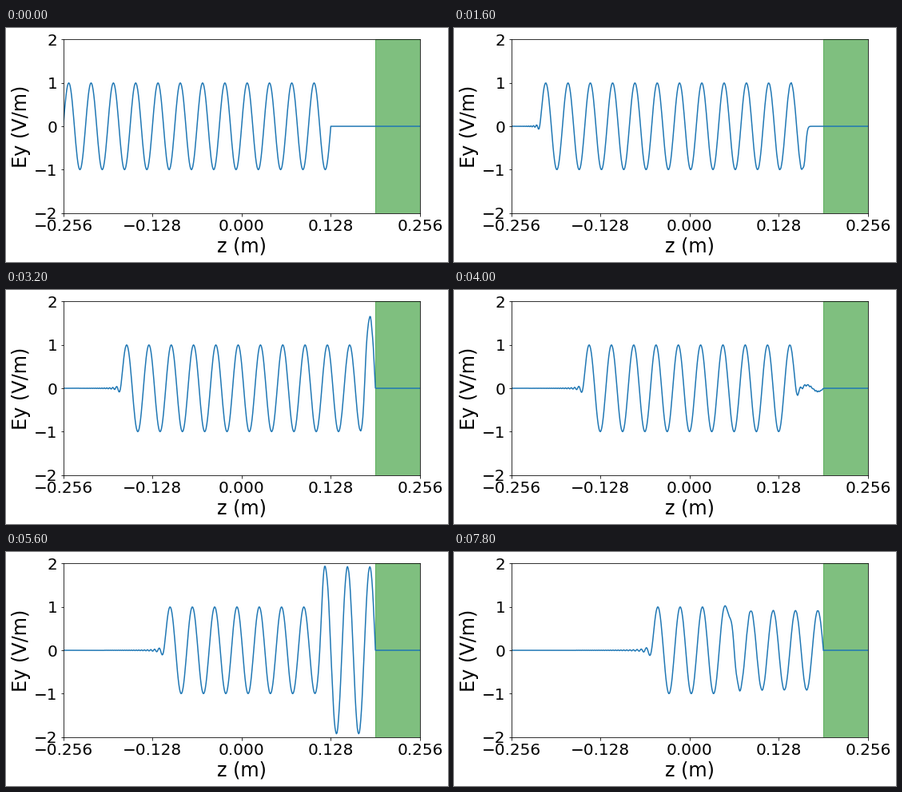
Recreate the animation shown at these times as a matplotlib script. Size 553 by 293 pixels, loop 8 s.

```python
import numpy as np
import matplotlib.pyplot as plt
from matplotlib.animation import FuncAnimation

# Stage
W, H, DPI = 553, 293, 72
FRAMES, INTERVAL = 40, 200

# One-dimensional field grid
DZ = 0.001
CELLS = 512
WAVE = 32                   # cells per wavelength
PULSE = 384                 # pulse length in cells
WALL = 448                  # first conducting cell
COURANT = 1 / np.sqrt(3)
STEPS = 9                   # time steps per frame
LOSS = 1000 * 376.73 * DZ * COURANT / 2


def pulse(x):
    inside = (x >= 0) & (x < PULSE)
    return np.where(inside, np.sin(2 * np.pi * x / WAVE), 0.0)


def simulate():
    """Leapfrog a right-going pulse into the conductor, one row per frame."""
    cell = np.arange(CELLS + 1)
    e = pulse(cell)
    h = -pulse(cell[:-1] + 0.5 + 0.5 * COURANT)
    loss = np.where(cell >= WALL, LOSS, 0.0)[1:-1]
    keep = (1 - loss) / (1 + loss)
    gain = COURANT / (1 + loss)
    rows = [e.copy()]
    for _ in range(FRAMES - 1):
        for _ in range(STEPS):
            h += COURANT * np.diff(e)
            e[1:-1] = keep * e[1:-1] + gain * np.diff(h)
        rows.append(e.copy())
    return rows


plt.rcParams["font.family"] = "DejaVu Sans"
fields = simulate()
z = (np.arange(CELLS + 1) - CELLS / 2) * DZ

fig = plt.figure(figsize=(W / DPI, H / DPI), dpi=DPI, facecolor="white")
ax = fig.add_axes([71.58 / W, 61.2 / H, 446.4 / W, 217.44 / H])
ax.axvspan(0.192, 0.256, color="green", alpha=0.5)
line, = ax.plot(z, fields[0], color="#1f77b4", lw=1.5)

ax.set_xlim(-0.256, 0.256)
ax.set_ylim(-2, 2)
ax.set_xticks([-0.256, -0.128, 0, 0.128, 0.256])
ax.set_yticks([-2, -1, 0, 1, 2])
ax.tick_params(labelsize=20)
ax.set_xlabel("z (m)", fontsize=24)
ax.set_ylabel("Ey (V/m)", fontsize=24)


def update(i):
    line.set_ydata(fields[i])
    return line,


anim = FuncAnimation(fig, update, frames=FRAMES, interval=INTERVAL,
                     repeat=True, repeat_delay=0)
plt.show()
```
